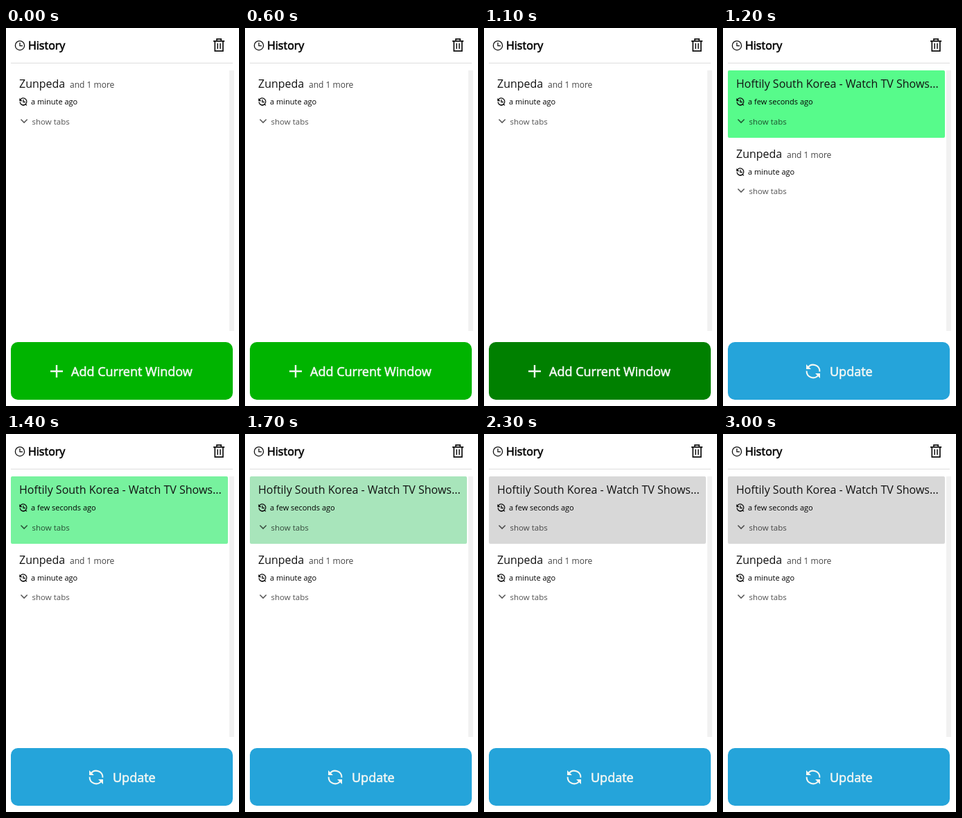
Animation, 336 px wide and 544 px high, one loop 3100 ms. Source, as an HTML page:

```html
<!DOCTYPE html>
<html lang="en">
<head>
<meta charset="utf-8">
<title>History</title>
<style>
  html, body { margin: 0; width: 100%; height: 100%; overflow: hidden; background: #fff; }
  svg { display: block; font-family: "Open Sans", "Noto Sans", sans-serif; }
  .line { fill: none; stroke: #111; stroke-width: 1.3; }
  .head, .label { stroke-width: .6px; stroke: currentColor; fill: currentColor; }
  .head { font-size: 16px; color: #000; }
  .label { font-size: 18px; color: #f3f7f3; }
  .title { font-size: 16px; fill: #111; }
  .more { font-size: 12px; fill: #444; }
  .time { font-size: 11px; fill: #000; }
  .tabs { font-size: 11.5px; fill: #000; fill-opacity: .68; }
  .chevron { fill: none; stroke: #000; stroke-opacity: .66; stroke-width: 1.5; }
  .icon { fill: none; stroke: #f3f7f3; stroke-width: 2; }
  .tip { fill: #f3f7f3; }
</style>
</head>
<body>
<svg width="336" height="544" viewBox="0 0 336 544">
  <defs>
    <g id="ago">
      <path class="line" stroke-width="1.2" d="M20.6 103.2A5 5 0 1 1 22 110M25 103v3.5h3"/>
      <path d="M19.4 101v4.2h4.2z"/>
      <path class="line" d="M20.2 106.5A5 5 0 0 0 28.5 109.8l1.5 1.6"/>
    </g>
    <path id="chevron" class="chevron" d="M21.5 131.5l4.6 4.6 4.6-4.6"/>
  </defs>

  <circle class="line" cx="20" cy="25.2" r="6.6"/>
  <path class="line" d="M20 21v4.6h4"/>
  <text class="head" x="32" y="31">History</text>
  <g class="line" style="stroke-width:1.7">
    <path d="M299 18.8h16.2M304 18.5v-2.7h6.2v2.7M301.3 19v14.2h11.6V19"/>
    <path d="M305.2 22v8M309 22v8" style="stroke-width:1.5"/>
  </g>
  <path d="M7 50.5h320" stroke="#dedede"/>
  <rect x="322" y="61" width="7" height="375" fill="#f1f1f1"/>

  <g id="before"></g>
  <g id="after">
    <rect id="card" x="7" y="61" width="313" height="97" rx="2"/>
  </g>

  <rect id="button" x="7" y="452" width="320" height="83" rx="10"/>
  <g id="add">
    <path class="icon" style="stroke-width:2.4" d="M64 494h18M73 485v18"/>
    <text class="label" x="94" y="501">Add Current Window</text>
  </g>
  <g id="update">
    <path class="icon" d="M122.5 488.5A9.4 9.4 0 0 1 139.4 494.5M137.5 499.5A9.4 9.4 0 0 1 120.6 493.5"/>
    <path class="tip" d="M120 484v7h7zM140 504v-7h-7z"/>
    <text class="label" x="154" y="501">Update</text>
  </g>
</svg>
<script>
const LOOP = 3100, ADDED = 1200;
const $ = id => document.getElementById(id);

function addItem(parent, dy, tabsDy, title, more, time) {
  $(parent).insertAdjacentHTML("beforeend", `
    <text class="title" x="19" y="${86 + dy}">${title}</text>
    <text class="more" x="92" y="${86 + dy}">${more}</text>
    <use href="#ago" y="${dy}"/>
    <text class="time" x="36" y="${110 + dy}">${time}</text>
    <use href="#chevron" y="${tabsDy}"/>
    <text class="tabs" x="37.5" y="${139 + tabsDy}">show tabs</text>`);
}

// Each step is [ms, value, easing towards the next step].
function play(id, prop, steps) {
  const last = steps[steps.length - 1][1];
  const frames = [...steps, [LOOP, last]].map(([ms, value, easing = "step-end"]) =>
    ({ offset: ms / LOOP, [prop]: value, easing }));
  $(id).animate(frames, { duration: LOOP, iterations: Infinity });
}

const old = ["Zunpeda", "and 1 more", "a minute ago"];
addItem("before", 0, 0, ...old);
addItem("after", 0, 0, "Hoftily South Korea - Watch TV Shows...", "", "a few seconds ago");
addItem("after", 101, 100, ...old);

for (const id of ["before", "add"]) play(id, "opacity", [[0, 1], [ADDED, 0]]);
for (const id of ["after", "update"]) play(id, "opacity", [[0, 0], [ADDED, 1]]);

play("button", "fill", [
  [0, "#00b400"], [600, "#00b400", "steps(2)"], [800, "#008000"], [ADDED, "#25a4da"]
]);
play("card", "fill", [
  [0, "#57fb8b"], [ADDED, "#57fb8b", "steps(8)"], [2000, "#d8d8d8"]
]);
</script>
</body>
</html>
```
